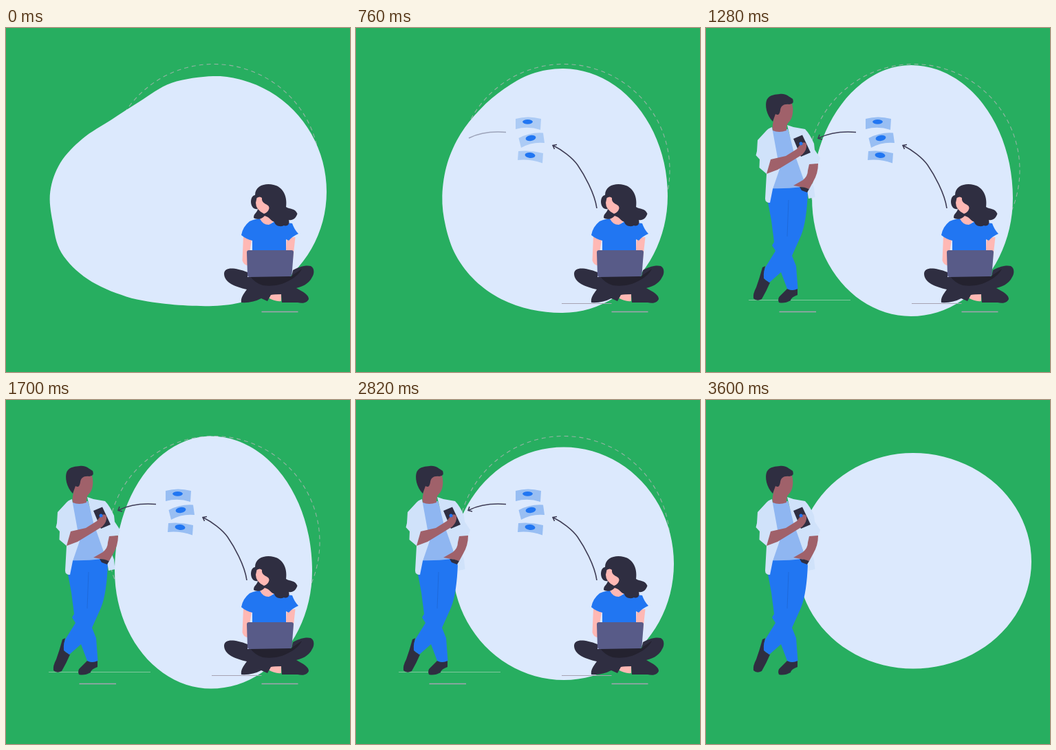
These frames come from a looping animation (500 by 500 pixels, 3.62 s). An HTML page with a canvas:

```html
<!DOCTYPE html>
<html lang="en">
<head>
<meta charset="utf-8">
<title>Sending money</title>
<style>
html, body { margin: 0; width: 100%; height: 100%; overflow: hidden; background: #27ae60; }
canvas { display: block; width: 500px; height: 500px; }
</style>
</head>
<body>
<canvas id="stage" width="500" height="500"></canvas>
<script>
const ctx = document.getElementById('stage').getContext('2d');
const LOOP = 3620;
const C = {
  bg: '#27ae60', blob: '#dce9fd', blue: '#2176f2', dark: '#2f2e41', shade: '#24222f',
  pink: '#ffb8b4', laptop: '#585b88', brown: '#a0616a', coat: '#d0e2fa', tee: '#8fb6f1',
  note: '#98bef3', arrow: '#3f3d56', line: '#a6a2b2'
};

// Blob poses: time, centre x, centre y, left, right, top, bottom
const POSES = [
  [0, 301, 238, 63, 466, 70, 404],
  [760, 300, 244, 125, 453, 59, 414],
  [1280, 298, 247, 154, 446, 54, 419],
  [1700, 298, 248, 158, 445, 52.5, 419.5],
  [2220, 299, 246, 152, 451, 59, 414.5],
  [2820, 302, 238, 140, 462, 68.5, 407],
  [3600, 301, 235, 133, 473, 77, 390.5]
];
// Radial scale on the left half, from bottom to top in 15 degree steps
const DENTS = [1, 1.02, 1.06, 1.083, 1.07, 1.015, 0.995, 0.966, 0.92, 0.88, 0.9, 0.975, 1];

const clamp = v => Math.max(0, Math.min(1, v));
const ramp = (t, from, to) => clamp((t - from) / (to - from));

function poseAt(t) {
  const last = POSES.length - 1;
  let i = 0;
  while (i < last - 1 && t >= POSES[i + 1][0]) i++;
  const a = POSES[i], b = POSES[i + 1];
  const before = POSES[Math.max(0, i - 1)], after = POSES[Math.min(last, i + 2)];
  const span = b[0] - a[0], u = clamp((t - a[0]) / span), u2 = u * u, u3 = u2 * u;
  return a.map((v, k) => {
    const m0 = (b[k] - before[k]) / (b[0] - before[0]) * span;
    const m1 = (after[k] - v) / (after[0] - a[0]) * span;
    return (2 * u3 - 3 * u2 + 1) * v + (u3 - 2 * u2 + u) * m0 +
           (3 * u2 - 2 * u3) * b[k] + (u3 - u2) * m1;
  });
}

function drawBlob(t) {
  const [, cx, cy, left, right, top, bottom] = poseAt(t);
  const dent = Math.pow(1 - clamp(t / 1500), 1.7);
  const pts = [];
  for (let i = 0; i < 24; i++) {
    const a = i * Math.PI / 12, c = Math.cos(a), s = Math.sin(a);
    const k = i >= 6 && i <= 18 ? 1 + (DENTS[i - 6] - 1) * dent : 1;
    pts.push([
      cx + c * k * (c > 0 ? right - cx : cx - left),
      cy + s * k * (s > 0 ? bottom - cy : cy - top)
    ]);
  }
  const at = i => pts[(i + 24) % 24];
  ctx.beginPath();
  ctx.moveTo(...pts[0]);
  for (let i = 0; i < 24; i++) {
    const [p, a, b, n] = [at(i - 1), at(i), at(i + 1), at(i + 2)];
    ctx.bezierCurveTo(a[0] + (b[0] - p[0]) / 6, a[1] + (b[1] - p[1]) / 6,
                      b[0] - (n[0] - a[0]) / 6, b[1] - (n[1] - a[1]) / 6, b[0], b[1]);
  }
  ctx.fillStyle = C.blob;
  ctx.fill();
}

function shape(color, d) {
  ctx.fillStyle = color;
  ctx.fill(new Path2D(d));
}

function stroke(color, width, d) {
  ctx.strokeStyle = color;
  ctx.lineWidth = width;
  ctx.stroke(new Path2D(d));
}

function oval(color, x, y, rx, ry, turn = 0) {
  ctx.fillStyle = color;
  ctx.beginPath();
  ctx.ellipse(x, y, rx, ry, turn, 0, Math.PI * 2);
  ctx.fill();
}

function faded(alpha, draw) {
  if (alpha <= 0) return;
  ctx.globalAlpha = alpha;
  draw();
  ctx.globalAlpha = 1;
}

function drawRing() {
  ctx.setLineDash([6, 5]);
  ctx.strokeStyle = '#93b3a3';
  ctx.lineWidth = 1.1;
  ctx.beginPath();
  ctx.arc(302, 206.5, 154, 0, Math.PI * 2);
  ctx.stroke();
  ctx.setLineDash([]);
}

function drawWoman() {
  shape(C.pink, 'M345 303L343.500 338Q346 345 351 345L357 308ZM408 305L407 322L417 336L420.500 304Z');
  shape(C.blue, 'M354 281Q363 277 370 277Q378 290 391 281L416 284Q419 293 425 299Q416 303 411 309L407 307V326H358V309Q349 307 342 301Q344 289 354 281Z');
  shape(C.pink, 'M374 268L388 275Q392 282 382 286Q373 286 369 277Z');
  shape(C.pink, 'M364 245L374 244L383 258Q384 269 375 270Q364 265 363 253Z');
  shape(C.dark, 'M362 243C362 229 377 225 389 228C403 231 409 245 407 260C412 264 420 261 423.500 270C421 278 415 280 411 279C413 285 409 289 404 287C398 290 391 287 390 282C384 280 384 275 376 273C372 278 365 279 360 276C360 269 365 269 366 263C358 265 354 255 357 247Q359 243 362 243Z');
  shape(C.pink, 'M364.500 247Q369 244 372 247C371 257 383 255 382.500 262Q381 268 375 270Q363 264 363 254Z');
  shape(C.pink, 'M384 386H400L400 397Q391 398 381 392Z');
  shape(C.dark, 'M317 357C318 347 332 348 351 355V362H415L417 352C430 345 438 345 443 346C449 349 448 358 445 362C440 373 429 376 422 378C433 384 440 388 440 394C437 401 429 400 424 399H401L400 387Q390 387 385 388L380 397L371 393Q358 400 342 399C341 392 345 387 350 380C333 376 317 370 317 357Z');
  shape(C.shade, 'M355 361H414L430 350Q424 363 401 372Q389 376 373 374Q361 370 355 361Z');
  shape(C.laptop, 'M353 323H415Q418 323 418 326L415.500 358Q415 361 412 361L354 362Q351 362 351 359L350 326Q350 323 353 323Z');
}

function drawNotes(paper, mark) {
  faded(paper, () => shape(C.note,
    'M232 132Q250 127 269 132L268 148Q250 142 232 147Z' +
    'M236.500 160Q254 151 272 152.500L274 167Q256 165 240 174Z' +
    'M236 179Q254 177 272 182L271 196.500Q253 190 235 192Z'));
  faded(mark, () => {
    oval(C.blue, 249.5, 136.3, 7.3, 3.4);
    oval(C.blue, 254, 160, 7.5, 4, -0.17);
    oval(C.blue, 253, 185, 7.5, 3.9, 0.09);
  });
}

function drawMan() {
  shape(C.dark, 'M82 348L86 346Q83 360 86 366L93 370Q88 382 81 394Q74 398 69 393Q68 386 73 377Q78 363 82 348Z');
  shape(C.dark, 'M118 379Q126 383 133 378V388Q124 391 123 396Q114 401 106 399Q103 393 109 388Z');
  shape(C.blue, 'M95 232L137 230L148 239C147 264 144 288 138 302L125 331L131 346L133.500 379Q125 383 118 379L109 355L92 370L84 364Q83 351 88 345L101 324L96 316L99 311L95 280L90 253Z');
  stroke('#1d66d4', 0.8, 'M120 250L118 303');
  shape(C.tee, 'M95 149L119 147L126 170L143 223L140 231Q115 234 93 233Z');
  shape(C.brown, 'M100 122L109 111L125 110Q127 118 126 124Q125 132 121 136Q116 140 117 149Q106 153 97 149Q96 143 98 135Z');
  shape(C.dark, 'M97 136C88 127 85 112 88.500 104C93 96 102 97 107 96C117 95 120 100 126 103C128 109 126 110 121 111C113 110 109 113 108 119C107 127 104 127 101 125Z');
  shape(C.coat, 'M96 144Q90 146 87 150L75 163L74 179L72.500 185L78 191L77.500 203L88 212L86 248Q86 254 93 254L97 234L107 205L97 150Z');
  shape(C.coat, 'M118 141L127 144L144 147Q151 154 157 168L158 177L166 189L163 197L152 199L148 209L157 232L158.500 246L149 248L147 235L127 178Z');
  shape(C.brown, 'M150 198L163 197Q163 211 156 223L150 234L138 231L127 229L141 221Q148 215 148 207Z');
  shape(C.dark, 'M136 231Q143 231 150 234L147 239L139 236Z');
  shape(C.dark, 'M127 161L140 155.500L152 181L138 187Z');
  shape(C.brown, 'M94 191L116 186L132 176L138 168Q144 164 146 169Q147 177 140 184L104 206L88 212Z');
  oval(C.blue, 138, 168, 2.5, 2.5);
}

function render(t) {
  ctx.fillStyle = C.bg;
  ctx.fillRect(0, 0, 500, 500);
  const stay = 1 - ramp(t, 3150, 3500);
  const show = (from, to) => ramp(t, from, to) * stay;

  faded(stay, drawRing);
  drawBlob(t);

  faded(show(100, 400), () => stroke(C.line, 1, 'M299 400.500H371.500'));
  faded(stay, () => {
    stroke(C.line, 1.5, 'M371.500 412.500H424.500');
    drawWoman();
  });
  faded(show(200, 500), () =>
    stroke(C.arrow, 1.6, 'M350 262C347 240 331 212 322 199C314 188 299 177 287 171M292 169.500L286 170.500L288.500 176'));
  drawNotes(show(400, 920), show(300, 640));
  faded(show(600, 1000), () => stroke(C.arrow, 1.6, 'M218 151.500Q186 149 164 160'));
  faded(show(780, 1000), () => stroke(C.arrow, 1.6, 'M165 155L163 160.500L169 162'));
  faded(show(800, 1060), () => {
    stroke('#7fc79d', 1, 'M62 395.500H210');
    stroke(C.line, 1.5, 'M106.500 412.500H160');
  });
  faded(ramp(t, 800, 1060), drawMan);
}

const start = performance.now();
function tick(now) {
  render(Math.max(0, now - start) % LOOP);
  requestAnimationFrame(tick);
}
render(0);
requestAnimationFrame(tick);
</script>
</body>
</html>
```
